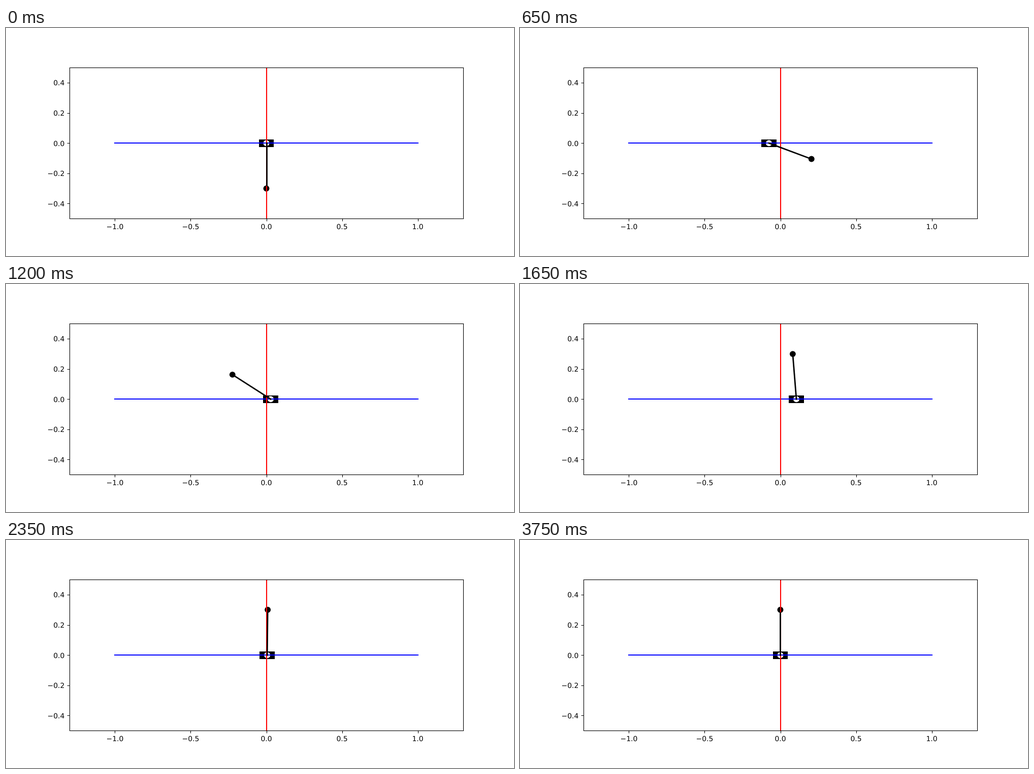
These frames come from a looping animation (1000x450 px, 4050 ms). An HTML page:

```html
<!DOCTYPE html>
<html lang="en">
<head>
<meta charset="utf-8">
<title>Cart-pole swing-up</title>
<style>
  html, body { margin: 0; width: 100%; height: 100%; overflow: hidden; background: #fff; }
  svg { display: block; width: 1000px; height: 450px; }
  text { font: 13.89px "DejaVu Sans", sans-serif; text-rendering: geometricPrecision; }
</style>
</head>
<body>
<svg viewBox="0 0 1000 450">
  <rect id="cart" y="220" height="15"/>
  <circle id="hub" cy="227.25" r="5.96" fill="#fff"/>
  <circle id="bob" r="5.96"/>
  <path d="M213 227H812" stroke="#00f" stroke-width="2.08"/>
  <path d="M513 78V376.3" stroke="#f00" stroke-width="2.08"/>
  <line id="pole" stroke="#000" stroke-width="2.78" stroke-linecap="square"/>
  <rect x="125.5" y="78.5" width="775" height="298" fill="none" stroke="#000" stroke-width="1.11"/>
  <g id="axes" stroke-width="1.11"></g>
</svg>
<script>
const CX = 512.5, CY = 227.25, UNIT = 775 / 2.6;
const ARM = 0.3 * UNIT, ROD = 0.28 * UNIT, HALF = 0.05 * UNIT;
const LOOP = 4050, STEP = 50;

// Turning points [s, value] of the swing-up, then a damped settling rule.
const cart = {
  keys: [[0, 0], [.36, .21], [.65, -.0755], [.87, -.228], [1.2, .0285], [1.42, .231], [1.65, .1057]],
  settle: s => .1057 * Math.exp(-4.2 * s)
};
// Angle from hanging straight down.
const pole = {
  keys: [[0, 0], [.27, -.4], [.65, 1.213], [.9, .12], [1.1, -1.571], [1.2, -2.142], [1.65, .08 - Math.PI]],
  settle: s => (.08 - 1.15 * s) * Math.exp(-6 * s) - Math.PI
};

const $ = id => document.getElementById(id);
const set = (el, attrs) => { for (const k in attrs) el.setAttribute(k, attrs[k]); };
const label = v => v.toFixed(1).replace("-", "\u2212");

function add(tag, attrs, text = "") {
  const el = document.createElementNS("http://www.w3.org/2000/svg", tag);
  set(el, attrs);
  el.textContent = text;
  $("axes").append(el);
}

for (let i = -2; i <= 2; i++) {
  const x = CX + i / 2 * UNIT, y = CY - i / 5 * UNIT;
  const tx = Math.round(x) + .5, ty = Math.round(y) + .5;
  add("path", { d: `M${tx} 376.5v4.9M125.5 ${ty}h-4.9`, stroke: "#000" });
  add("text", { x, y: 397, "text-anchor": "middle" }, label(i / 2));
  add("text", { x: 115.3, y: Math.round(y + 5.3), "text-anchor": "end" }, label(i / 5));
}

function slope({ keys, settle }, i) {
  if (i === 0) return 0;
  if (i === keys.length - 1) return (settle(.001) - settle(0)) / .001;
  const [[t0, v0], [t1, v1], [t2, v2]] = keys.slice(i - 1, i + 2);
  const h = t1 - t0, g = t2 - t1;
  return ((v1 - v0) / h * g + (v2 - v1) / g * h) / (h + g);
}

// Cubic Hermite curve through the keys, then the settling rule.
function sample(track, t) {
  const i = track.keys.findIndex(k => k[0] > t) - 1;
  if (i < 0) return track.settle(t - track.keys.at(-1)[0]);
  const [[t0, v0], [t1, v1]] = track.keys.slice(i, i + 2);
  const h = t1 - t0, s = (t - t0) / h, d = v1 - v0;
  const m = slope(track, i) * h, n = slope(track, i + 1) * h;
  return v0 + s * (m + s * (3 * d - 2 * m - n + s * (m + n - 2 * d)));
}

function draw(ms) {
  const t = Math.floor(ms % LOOP / STEP) * STEP / 1000;
  const x = CX + sample(cart, t) * UNIT, angle = sample(pole, t);
  const dx = Math.sin(angle), dy = Math.cos(angle);
  const left = Math.round(x - HALF), right = Math.round(x + HALF);
  const px = angle ? x : x + 1; // an exactly vertical pole sits on the pixel grid
  set($("cart"), { x: left, width: right - left });
  set($("hub"), { cx: x });
  set($("bob"), { cx: x + ARM * dx, cy: CY + ARM * dy });
  set($("pole"), { x1: px, y1: CY, x2: px + ROD * dx, y2: CY + ROD * dy });
}

let start;
function tick(now) {
  start ??= now;
  draw(now - start);
  requestAnimationFrame(tick);
}
draw(0);
requestAnimationFrame(tick);
</script>
</body>
</html>
```
